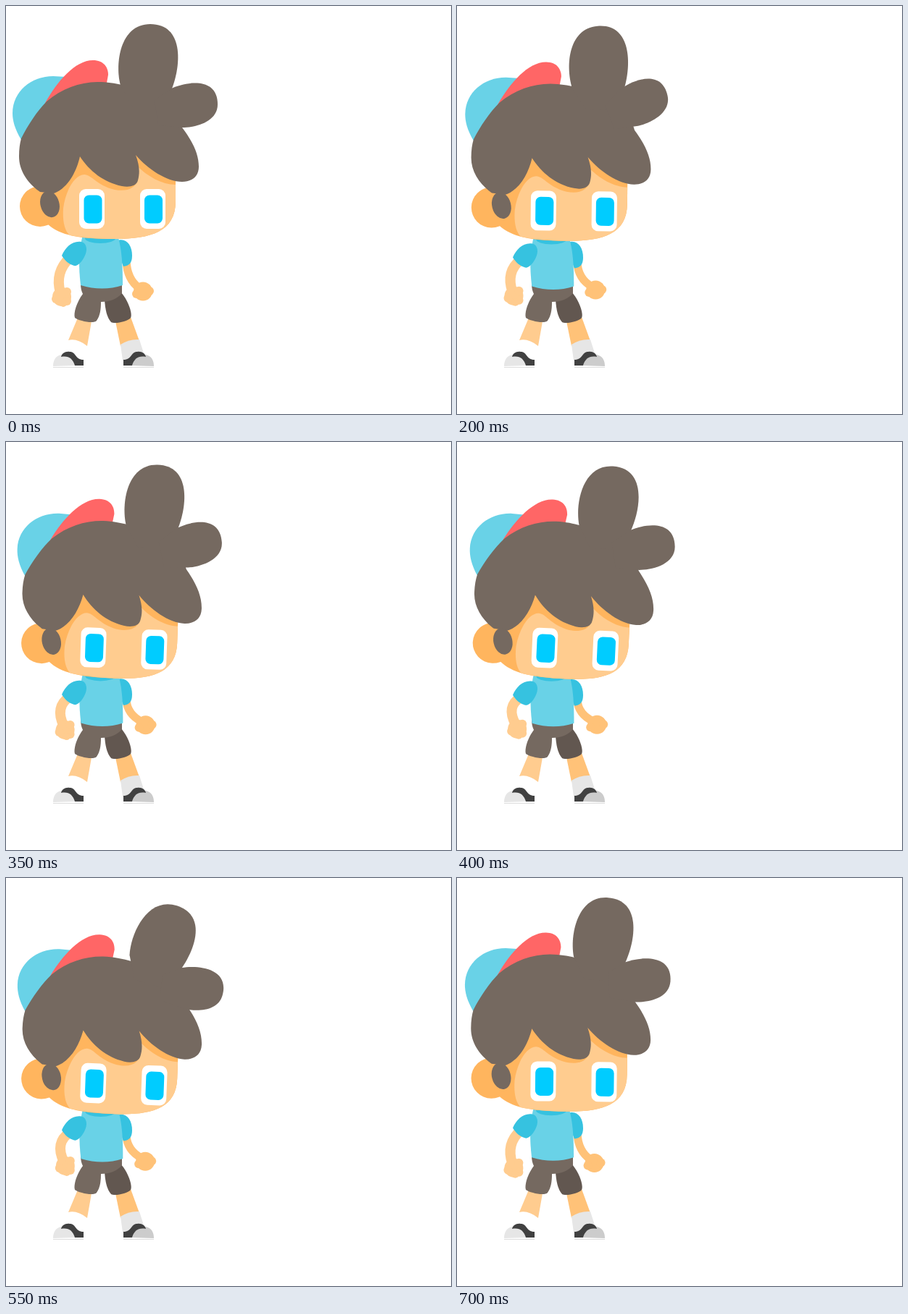
An HTML page for the animation above (750 ms loop, 614 by 564 pixels).

```html
<!DOCTYPE html>
<html lang="en">
<head>
<meta charset="utf-8">
<title>Idle boy</title>
<style>
  html, body { margin: 0; width: 100%; height: 100%; overflow: hidden; background: #fff; }
  svg { display: block; width: 614px; height: 564px; }
  .hair { fill: #756960; }
  .skin { fill: #ffcc8f; }
  .shade { fill: #ffb55e; }
  .far { fill: #ffc278; }
  .cloth { fill: #69d2e7; }
  .trim { fill: #36c2e0; }
  .dark { fill: #625750; }
  .shoe { fill: #414141; }
  .arm { fill: none; }
</style>
</head>
<body>
<svg viewBox="0 0 614 564">
  <defs>
    <path id="upper" class="shoe" d="M162 497V489C174 489 172 478 181 478C187 477 192 480 193 485C183 483 177 487 174 497Z"/>
    <path id="toe" d="M174 497C177 487 183 483 193 482C201 484 204 490 204 498Z"/>
    <path id="sole" d="M162 499.5H204" stroke="#ddd"/>
  </defs>

  <!-- legs and shoes -->
  <path class="far" d="M151 436L172 430L184 463L158 470Z"/>
  <path fill="#e6e6e6" d="M158 468Q170 460 184 461L190 480L176 488L161 490Z"/>
  <path class="skin" d="M99 431L118 436L112 470Q98 459 86 462Z"/>
  <use href="#toe" fill="#ccc"/><use href="#upper"/><use href="#sole"/>
  <g transform="matrix(-1 0 0 1 269 0)">
    <use href="#toe" fill="#e6e6e6"/><use href="#upper"/><use href="#sole"/>
  </g>

  <!-- shorts -->
  <path class="dark" d="M136 406C137 420 139 430 145 437C150 440 168 436 172 431C175 425 168 405 157 394Z"/>
  <path class="hair" d="M103 384H160V397Q150 409 131 409C131 419 130 428 125 435C121 440 100 435 95 431C93 425 97 410 106 398Q103 392 103 384Z"/>

  <!-- arms and shirt -->
  <path id="rightArm" class="arm" stroke="#ffc278" stroke-width="11"/>
  <g id="rightHand" class="far">
    <circle cx="189" cy="394.5" r="13"/>
    <circle cx="180" cy="398" r="6"/><circle cx="198" cy="394" r="6"/>
  </g>
  <path id="rightSleeve" class="trim" d="M152 325C165 319 174 330 174 345C174 355 170 359 162 360L156 345Z"/>
  <g id="shirt">
    <path class="cloth" d="M106 316H154C159 335 161 350 161 386Q133 395 103 386C100 360 100 340 106 316Z"/>
    <ellipse class="trim" cx="130" cy="321" rx="21" ry="7"/>
  </g>
  <path id="leftArm" class="arm" stroke="#ffcc8f" stroke-width="14"/>
  <g id="leftHand" class="skin">
    <circle cx="77" cy="402" r="13"/><circle cx="69" cy="405" r="6"/>
    <circle cx="84" cy="395" r="6"/><circle cx="84" cy="408" r="6"/><circle cx="79" cy="411" r="5"/>
  </g>
  <path id="leftSleeve" class="trim" d="M77 345C82 333 92 324 104 326C112 328 113 338 108 347C104 355 98 360 94 359C87 357 81 352 77 345Z"/>

  <g id="head">
    <circle class="shade" cx="47" cy="277" r="28"/>
    <path class="shade" d="M58 302C75 317 100 322 150 322C200 322 234 312 234 270V200H75L60 255Z"/>
    <path class="skin" d="M88 317C80 310 78 295 79 280C82 255 95 233 108 233C118 233 125 248 150 254C168 257 178 252 182 240V222C195 235 215 247 234 247V270C234 312 200 322 150 322C125 322 105 320 88 317Z"/>
    <g fill="#fff">
      <rect x="101" y="253" width="35" height="55" rx="9"/>
      <rect x="185" y="253" width="35" height="55" rx="9"/>
    </g>
    <g fill="#0cf">
      <rect x="107.5" y="261.5" width="25" height="39" rx="7"/>
      <rect x="191" y="261.5" width="25" height="39" rx="7"/>
    </g>
    <path class="cloth" d="M21 185C12 170 9 158 9 148C9 118 35 97 65 97L84 98L55 140Z"/>
    <path fill="#f66" d="M54 134C70 105 95 75 120 75C135 75 141 85 141 95L138 112L60 142Z"/>
    <path class="hair" d="M21 183C30 165 43 145 56 132C77 114 101 105.5 126 105C140 105 150 107 160 109L229 125L243 168C258 188 266 205 266 222C266 237 255 243 243 243C222 243 195 225 179 206C184 220 185 230 182 241C180 249 170 251 160 249C135 244 115 228 102 208C97 230 85 252 66 259L47 257C30 245 18 228 18 208C18 198 19 190 21 183Z"/>
    <ellipse class="hair" cx="60.5" cy="274" rx="13" ry="18.5" transform="rotate(-15 60.5 274)"/>
    <path id="tallTuft" class="hair" d="M158 110C150 80 157 25 199 25C245 25 242 80 229 114L215 140H175Z"/>
    <path id="sideTuft" class="hair" d="M228 114C250 104 292 98 292 136C292 160 262 168 243 168L210 165L205 130Z"/>
  </g>
</svg>
<script>
const LOOP = 750, STEP = 50;
const times = [0, 100, 200, 350, 450, 550, 700];
const tracks = {
  tilt: [0, .3, .65, 2, 3.1, 2.1, .6],
  drop: [0, 1.5, 2.5, 4, 5, 3.5, .6],
  tall: [0, -2.6, -5.2, -.5, 4, 16, 3.8],
  side: [0, -8.3, -13.6, -6, 1, 13, 4]
};
const $ = id => document.getElementById(id);
const count = times.length;
const timeAt = i => times[(i + count) % count] + Math.floor(i / count) * LOOP;

// Smooth periodic curve through the keys (cubic Hermite)
function sample(keys, t) {
  const value = i => keys[(i + count) % count];
  const slope = i => (value(i + 1) - value(i - 1)) / (timeAt(i + 1) - timeAt(i - 1));
  let i = count - 1;
  while (times[i] > t) i--;
  const span = timeAt(i + 1) - timeAt(i), u = (t - times[i]) / span, v = 1 - u;
  return v * v * (1 + 2 * u) * value(i) + u * u * (1 + 2 * v) * value(i + 1)
    + span * u * v * (v * slope(i) - u * slope(i + 1));
}

const place = (id, x, y, turn = '') =>
  $(id).setAttribute('transform', `translate(${x} ${y}) ${turn}`);

function draw(now) {
  const t = Math.floor((now % LOOP) / STEP) * STEP;
  const [tilt, drop, tall, side] = Object.values(tracks).map(keys => sample(keys, t));

  place('head', drop * .12, drop, `rotate(${tilt} 130 322)`);
  place('tallTuft', 0, 0, `rotate(${tall} 190 120)`);
  place('sideTuft', 0, 0, `rotate(${side} 220 145)`);
  place('shirt', drop * .1, drop * .6);
  place('leftSleeve', 0, drop);
  place('rightSleeve', 0, drop);

  const lx = tilt * 2.3, ly = -tilt * 1.95, rx = drop * .9, ry = -drop * .8;
  place('leftHand', lx, ly);
  place('rightHand', rx, ry);
  $('leftArm').setAttribute('d', `M88 ${348 + drop}Q67 ${368 + ly / 2} ${75 + lx} ${396 + ly}`);
  $('rightArm').setAttribute('d', `M166 ${352 + drop}Q167 ${378 + ry / 2} ${184 + rx} ${390 + ry}`);
  requestAnimationFrame(draw);
}
requestAnimationFrame(draw);
</script>
</body>
</html>
```
